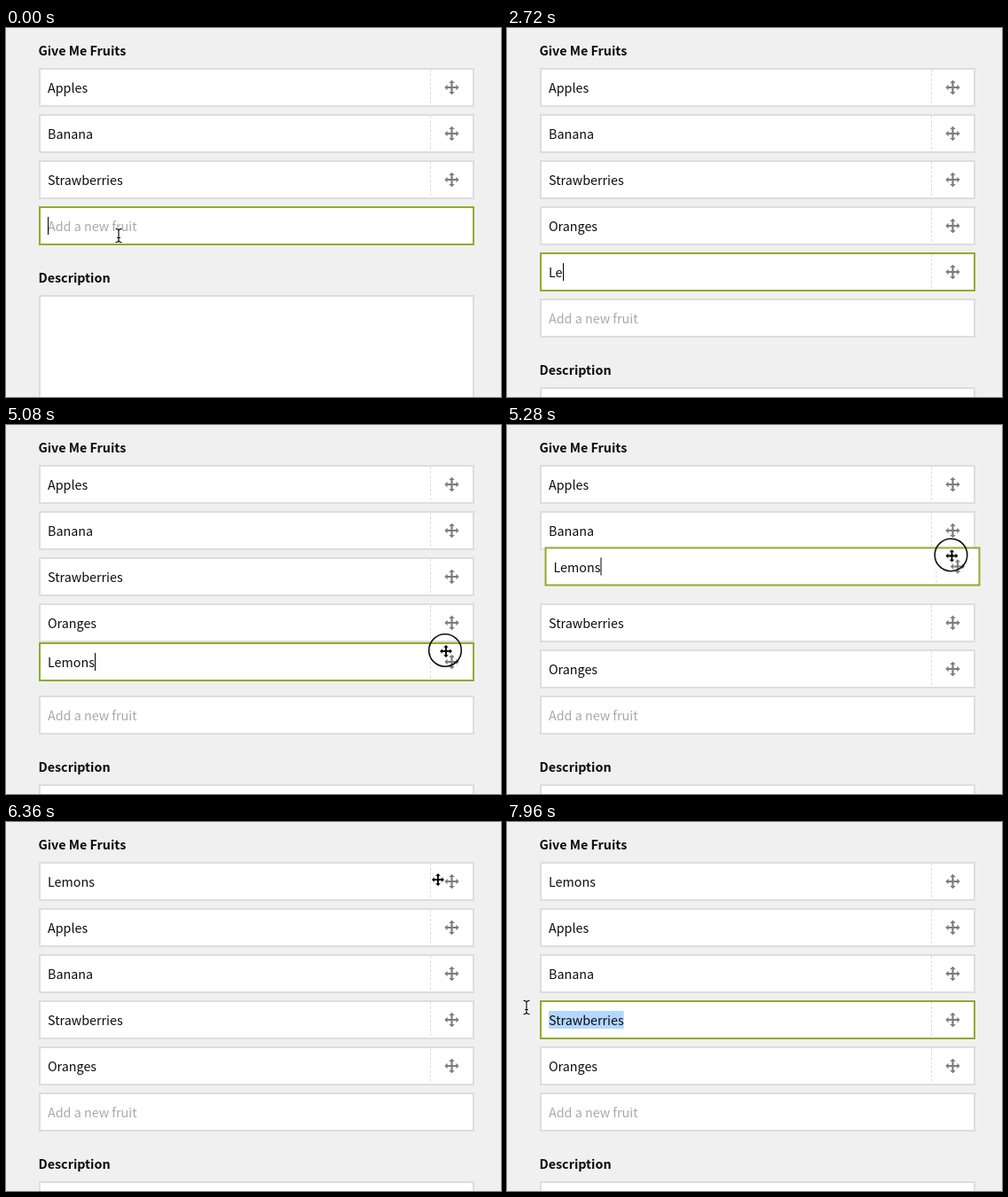
These frames come from a looping animation (558x416 px, 8 s). An HTML page:

```html
<!DOCTYPE html>
<html lang="en">
<head>
<meta charset="utf-8">
<title>Sortable fruit list</title>
<style>
  html, body { margin: 0; width: 100%; height: 100%; overflow: hidden; background: #f0f0f0; }
  svg { display: block; }
  text { font: 14.32px "Noto Sans CJK JP", "Noto Sans CJK SC", "Noto Sans CJK", sans-serif; fill: #0c0c0c; }
  .label { font-weight: 600; }
  .hint { fill: #a9a9a9; }
  .box { fill: #fff; stroke: #ddd; stroke-width: 2; }
  .focus { stroke: #8fac2c; }
  .dash { stroke: #dcdcdc; stroke-dasharray: 3 2; }
  .grip { fill: #7d7d7d; }
  .mark { fill: #b3d7ff; }
  .ring { fill: none; stroke: #111; stroke-width: 1.6; }
  .halo { fill: #fff; stroke: #fff; stroke-width: 2.6; stroke-linejoin: round; }
  .beam { fill: none; stroke: #111; stroke-width: 1.2; }
  .beam.under { stroke: #fff; stroke-width: 3; }
</style>
</head>
<body>
<svg id="stage" width="558" height="416" viewBox="0 0 558 416"></svg>
<script>
const LOOP = 8000, STEP = 40;
const LEFT = 37, TOP = 45, WIDTH = 491, HEIGHT = 44, PITCH = 52, PAD = 10;
const GRAB = 5000, DROP = 5880, SELECT = 7120, RELEASE = 7960;

const stage = document.getElementById('stage');
const pen = document.createElement('canvas').getContext('2d');
pen.font = '14.32px "Noto Sans CJK JP", "Noto Sans CJK SC", "Noto Sans CJK", sans-serif';
const textWidth = s => pen.measureText(s).width;

const oranges = { word: 'Oranges', keys: [440, 640, 800, 920, 1160, 1240, 1440] };
const lemons = { word: 'Lemons', keys: [2520, 2720, 2840, 3000, 3240, 3400] };
const typed = (entry, t) => entry.word.slice(0, entry.keys.filter(k => k <= t).length);

// spans of time in which the text caret shows
const caretSpans = [[0, 280], [440, 2360], [2520, 3880], [4360, 4840], [GRAB, DROP], [SELECT, LOOP]];
// spans in which the mouse button is held
const pressSpans = [[4840, DROP], [SELECT, RELEASE]];
const within = (spans, t) => spans.some(([a, b]) => t >= a && t < b);

// pointer path: time, x, y
const path = [
  [0, 127, 234], [3880, 127, 234], [3960, 300, 262], [4040, 492, 306], [4080, 514, 296],
  [4320, 514, 296], [4400, 533, 291], [4480, 516, 283], [4560, 496, 278],
  [4960, 496, 278], [5000, 496, 270], [5080, 496, 255], [5200, 499, 200], [5360, 504, 95],
  [5480, 506, 50], [5560, 507, 42], [5640, 507, 40], [5760, 506, 42], [5840, 506, 43],
  [5880, 504, 48], [5960, 500, 54], [6320, 500, 54], [6360, 487, 65], [6440, 455, 88],
  [6600, 360, 150], [6840, 230, 205], [7000, 190, 224], [7080, 185, 227],
  [7160, 185, 227], [7400, 150, 224], [7600, 95, 218], [7760, 50, 213], [7920, 22, 209], [LOOP, 22, 209]
];

function pointerAt(t) {
  const i = path.findIndex(p => p[0] > t);
  const [t0, x0, y0] = path[i - 1], [t1, x1, y1] = path[i];
  const k = (t - t0) / (t1 - t0);
  return { x: x0 + (x1 - x0) * k, y: y0 + (y1 - y0) * k };
}

const arm = 'M-1.1 1.1V-4.9H-3.3L0 -8.2L3.3 -4.9H1.1V1.1Z';
const cross = [0, 90, 180, 270].map(a => `<path d="${arm}" transform="rotate(${a})"/>`).join('');
const ibeam = 'M-3.5 -7.6Q0 -7.6 0 -5V5Q0 7.6 -3.5 7.6M3.5 -7.6Q0 -7.6 0 -5V5Q0 7.6 3.5 7.6M-2 2.5H2';
const arrow = 'M0 0V14L3.3 11L5.6 16L7.8 15L5.6 10.2H10Z';

const cursors = {
  move: `<g transform="scale(.85)"><g opacity=".28" transform="translate(0 2)">${cross}</g>
    <g class="halo">${cross}</g>${cross}</g>`,
  beam: `<path class="beam under" d="${ibeam}"/><path class="beam" d="${ibeam}"/>`,
  arrow: `<path class="halo" d="${arrow}"/><path d="${arrow}"/>`
};

const at = (x, y, body) => `<g transform="translate(${x} ${y})">${body}</g>`;
const slotY = i => TOP + PITCH * i;

function field({ text, x = LEFT, y, focus, caret, mark }) {
  let s = `<rect class="box ${focus ? 'focus' : ''}" x="1" y="1" width="${WIDTH - 2}" height="${HEIGHT - 2}"/>`;
  if (mark) s += `<rect class="mark" x="${PAD + mark[0]}" y="12" width="${mark[1] - mark[0]}" height="20"/>`;
  s += `<text x="${PAD}" y="28" class="${text ? '' : 'hint'}">${text || 'Add a new fruit'}</text>`;
  if (text) s += `<path class="dash" d="M441.5 2V42"/><g class="grip">${at(465.5, 22, cross)}</g>`;
  if (caret) s += `<rect x="${PAD + Math.round(textWidth(text))}" y="12" width="1" height="20"/>`;
  return at(x, y, s);
}

// span from the nearest letter boundary under the pointer to the end of the word
function selection(word, x) {
  const edges = [...word, ''].map((_, i) => textWidth(word.slice(0, i)));
  const want = x - LEFT - PAD;
  const start = edges.reduce((a, b) => Math.abs(b - want) < Math.abs(a - want) ? b : a);
  return [start, edges[edges.length - 1]];
}

function cursorKind(t, { x, y }, count) {
  if (t >= GRAB && t < DROP) return 'move';
  if (t >= SELECT) return 'beam';
  const row = Math.floor((y - TOP) / PITCH);
  if (x > LEFT + WIDTH || y - slotY(row) >= HEIGHT) return 'arrow';
  return x > 478 && row < count ? 'move' : 'beam';
}

function draw(t) {
  const p = pointerAt(t);
  const dragging = t >= GRAB && t < DROP;
  const caretOn = within(caretSpans, t);
  const rows = ['Apples', 'Banana', 'Strawberries'];
  const focus = t < 1880 ? 3 : t < DROP ? 4 : t < SELECT ? -1 : 3;
  if (typed(oranges, t)) rows.push(typed(oranges, t));
  if (typed(lemons, t)) rows.push(typed(lemons, t));
  if (t >= DROP) rows.unshift(rows.pop());

  const lift = p.y - 10;
  const marked = t >= SELECT ? selection(rows[3], p.x) : null;
  const hasMark = marked && marked[1] > marked[0];
  const count = rows.length;

  const fields = [...rows, ''].map((text, i) => {
    const held = dragging && i === 4;
    const pushed = dragging && i < 4 && lift < slotY(i) + HEIGHT / 2;
    return field({
      text,
      x: held ? p.x - 459 : LEFT,
      y: held ? lift : slotY(pushed ? i + 1 : i),
      focus: i === focus,
      caret: i === focus && caretOn && !hasMark,
      mark: i === focus && hasMark ? marked : null
    });
  });
  if (dragging) fields.push(...fields.splice(4, 1));

  const below = slotY(count + 1);
  let s = `<text class="label" x="36.5" y="31">Give Me Fruits</text>` + fields.join('') +
    `<text class="label" x="36.5" y="${below + 34}">Description</text>` +
    `<rect class="box" x="${LEFT + 1}" y="${below + 49}" width="${WIDTH - 2}" height="200"/>`;
  if (within(pressSpans, t)) s += `<circle class="ring" cx="${p.x - 1}" cy="${p.y - 1}" r="18.3"/>`;
  if (t < 480 || t >= 3880) s += at(p.x, p.y, cursors[cursorKind(t, p, count)]);
  stage.innerHTML = s;
}

let shown = -1;
function tick() {
  const t = Math.floor(performance.now() % LOOP / STEP) * STEP;
  if (t !== shown) draw(shown = t);
  requestAnimationFrame(tick);
}
tick();
</script>
</body>
</html>
```
